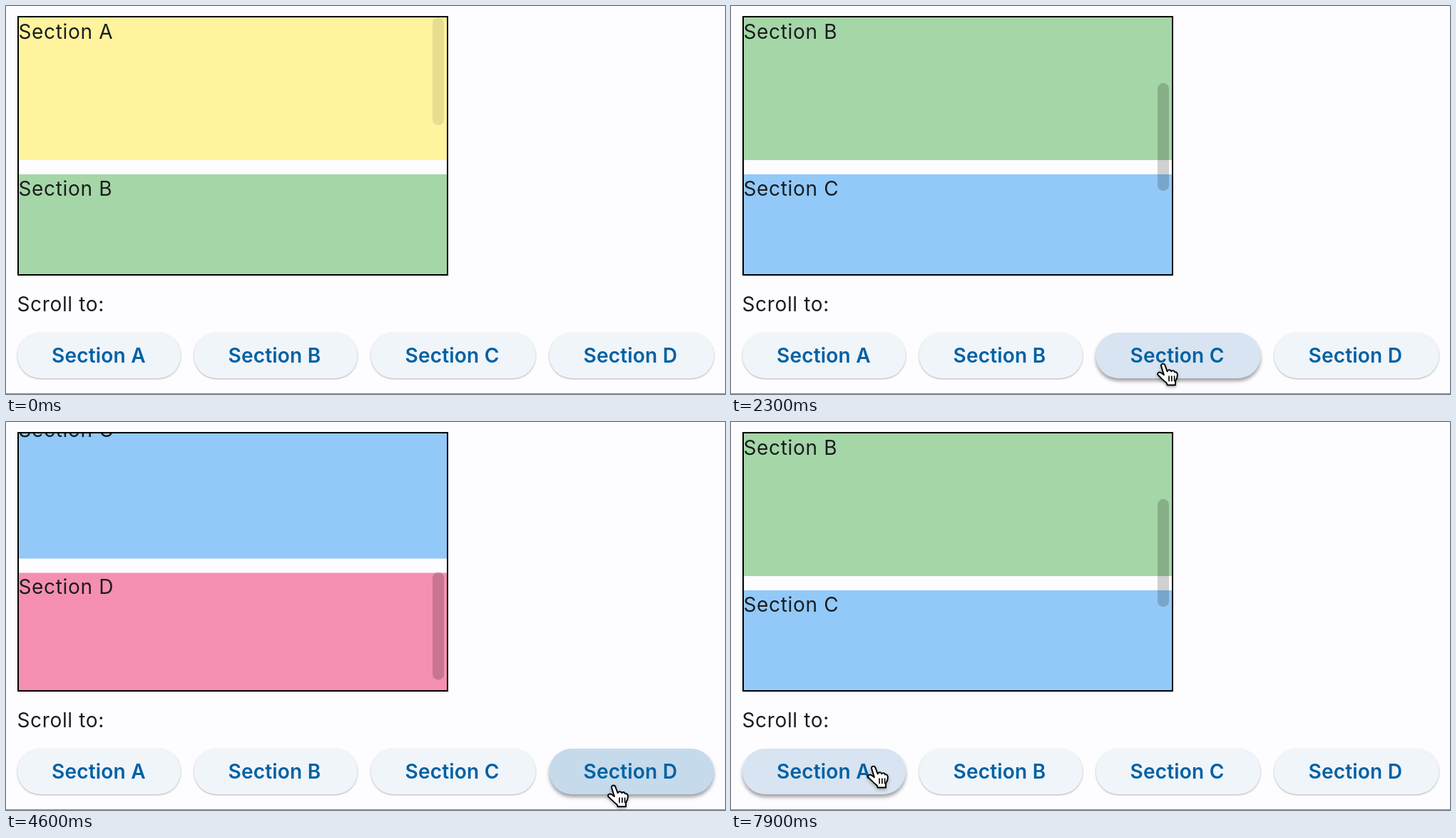
Recreate the animation shown at these times as an HTML page. Size 1008 by 544 pixels, loop 8 s.

```html
<!DOCTYPE html>
<html lang="en">
<head>
<meta charset="utf-8">
<title>Scroll to section</title>
<style>
  html, body { margin: 0; height: 100%; overflow: hidden; background: #fdfcff; }
  svg { display: block; }
  text { font: 28px Inter, Roboto, sans-serif; letter-spacing: .65px; fill: #1a1c1e; }
  .button text { font-weight: 580; letter-spacing: .2px; fill: #0061a4; }
</style>
</head>
<body>
<svg id="stage" width="1008" height="544" viewBox="0 0 1008 544">
  <clipPath id="view"><rect x="18" y="16" width="600" height="360"/></clipPath>
  <g clip-path="url(#view)">
    <g id="sections"></g>
    <rect id="thumb" x="598" width="16" height="151" rx="8"/>
  </g>
  <rect x="17" y="15" width="602" height="362" fill="none" stroke="#000" stroke-width="2"/>
  <text x="15.5" y="428">Scroll to:</text>
  <g id="buttons"></g>
  <path d="M0 543.5H1008" stroke="#858588"/>
  <g id="cursor" style="filter: drop-shadow(0 2px 2px rgba(0,0,0,.3))">
    <g id="hand" transform="translate(-1 0) scale(.95)" stroke="#000" stroke-width="2" stroke-linejoin="round" stroke-linecap="round">
      <path fill="#fff" d="M-2 3C-3-1 3-2 4 3L7 11C8 8 12 8 13 11C14 9 17 9 18 12C20 11 22 13 22 16C22 20 21 22 19 25V31H7L6 28C2 25-2 21-7 16C-8 13-5 11-2 13L2 16Z"/>
      <path d="M9.5 18V25M13.5 18V25M17.5 18V25" stroke-width="1.7"/>
    </g>
    <path id="arrow" d="M0 0V24L6 19L10 28L14 26L10 17H18Z" stroke="#fff" stroke-width="2"/>
  </g>
</svg>
<script>
const LOOP = 8000, STEP = 100, SCROLL_MS = 1000;
const byId = id => document.getElementById(id);
const clamp = v => Math.min(1, Math.max(0, v));
const mix = (a, b, k) => a + (b - a) * k;

const names = ['A', 'B', 'C', 'D'];
const fills = ['#fff39d', '#a5d6a7', '#92c9f8', '#f48fb1'];
const boxes = [[16, 229], [263.5, 229.5], [511.5, 231], [761.5, 231]];

// Each click: time, scroll target, button
const clicks = [
  [-1750, 0, 0], [984, 220, 1], [2700, 440, 2],
  [4350, 500, 3], [5670, 440, 2], [6883, 220, 1]
];

// Pointer tip: time, x, y
const path = [
  [350, 372, 560], [680, 379, 500], [1850, 379, 500], [2300, 606, 502],
  [2500, 618, 502], [3600, 618, 502], [4100, 852, 511], [5300, 852, 508],
  [5600, 684, 507], [5800, 682, 505], [6300, 682, 505], [6750, 432, 495],
  [7250, 432, 495], [7850, 200, 483]
];

byId('sections').innerHTML = names.map((name, i) => `
  <rect x="18" y="${16 + i * 220}" width="600" height="200" fill="${fills[i]}"/>
  <text x="17.5" y="${46 + i * 220}">Section ${name}</text>`).join('');
byId('buttons').innerHTML = names.map((name, i) => `
  <g class="button">
    <rect x="${boxes[i][0]}" y="458" width="${boxes[i][1]}" height="64" rx="32"/>
    <text x="${boxes[i][0] + 48}" y="500">Section ${name}</text>
  </g>`).join('');
const pills = document.querySelectorAll('.button rect');

// cubic-bezier(.25, .1, .25, 1)
function ease(x) {
  const bezier = (p1, p2, s) => 3 * p1 * s * (1 - s) ** 2 + 3 * p2 * s * s * (1 - s) + s ** 3;
  let low = 0, high = 1;
  for (let i = 0; i < 24; i++) {
    const mid = (low + high) / 2;
    if (bezier(.25, .25, mid) < x) low = mid; else high = mid;
  }
  return bezier(.1, 1, low);
}

function scrollState(t) {
  let offset = 0, opacity = 0;
  clicks.forEach(([start, target], i) => {
    if (t < start) return;
    const until = i + 1 < clicks.length ? Math.min(t, clicks[i + 1][0]) : t;
    const age = until - start;
    offset = mix(offset, target, ease(clamp(age / SCROLL_MS)));
    opacity = clamp(opacity + age / 300) - clamp((age - SCROLL_MS - 600) / 300);
  });
  return { offset, opacity };
}

function pointer(t) {
  const next = path.findIndex(p => p[0] > t);
  if (next === 0) return path[0].slice(1);
  if (next < 0) return path[path.length - 1].slice(1);
  const [t0, x0, y0] = path[next - 1], [t1, x1, y1] = path[next];
  let k = (t - t0) / (t1 - t0);
  k *= k * (3 - 2 * k);
  return [mix(x0, x1, k), mix(y0, y1, k)];
}

function buttonAt([x, y]) {
  return y < 458 || y > 522 ? -1 : boxes.findIndex(([left, width]) => x >= left && x <= left + width);
}

// Averaging the recent past softens the hover change
function hoverLevel(i, t) {
  let hits = 0;
  for (let k = 0; k < 5; k++) hits += buttonAt(pointer(t - k * 25)) === i;
  return hits / 5;
}

function pressLevel(i, t) {
  return Math.max(0, ...clicks.filter(c => c[2] === i).map(([start]) => {
    const age = t - start;
    return clamp((age + 20) / 100) * clamp((450 - age) / 150);
  }));
}

const blend = (a, b, k) => a.map((v, i) => mix(v, b[i], k));

function draw(t) {
  const { offset, opacity } = scrollState(t);
  byId('sections').setAttribute('transform', `translate(0 ${-offset})`);
  byId('thumb').setAttribute('y', 16 + offset * 360 / 860);
  byId('thumb').setAttribute('fill-opacity', .18 * opacity);

  pills.forEach((pill, i) => {
    const hover = hoverLevel(i, t);
    const color = blend(blend([240, 245, 250], [216, 228, 241], hover), [197, 218, 235], pressLevel(i, t));
    pill.style.fill = `rgb(${color.map(Math.round)})`;
    pill.style.filter = `drop-shadow(0 ${mix(1.5, 4, hover)}px ${mix(1, 2.5, hover)}px rgba(0,0,0,${mix(.3, .36, hover)}))`;
  });

  const tip = pointer(t), overButton = buttonAt(tip) >= 0;
  byId('cursor').setAttribute('transform', `translate(${tip})`);
  byId('hand').style.display = overButton ? '' : 'none';
  byId('arrow').style.display = overButton ? 'none' : '';
}

function frame(now) {
  draw(Math.floor(now % LOOP / STEP) * STEP);
  requestAnimationFrame(frame);
}
requestAnimationFrame(frame);
</script>
</body>
</html>
```
